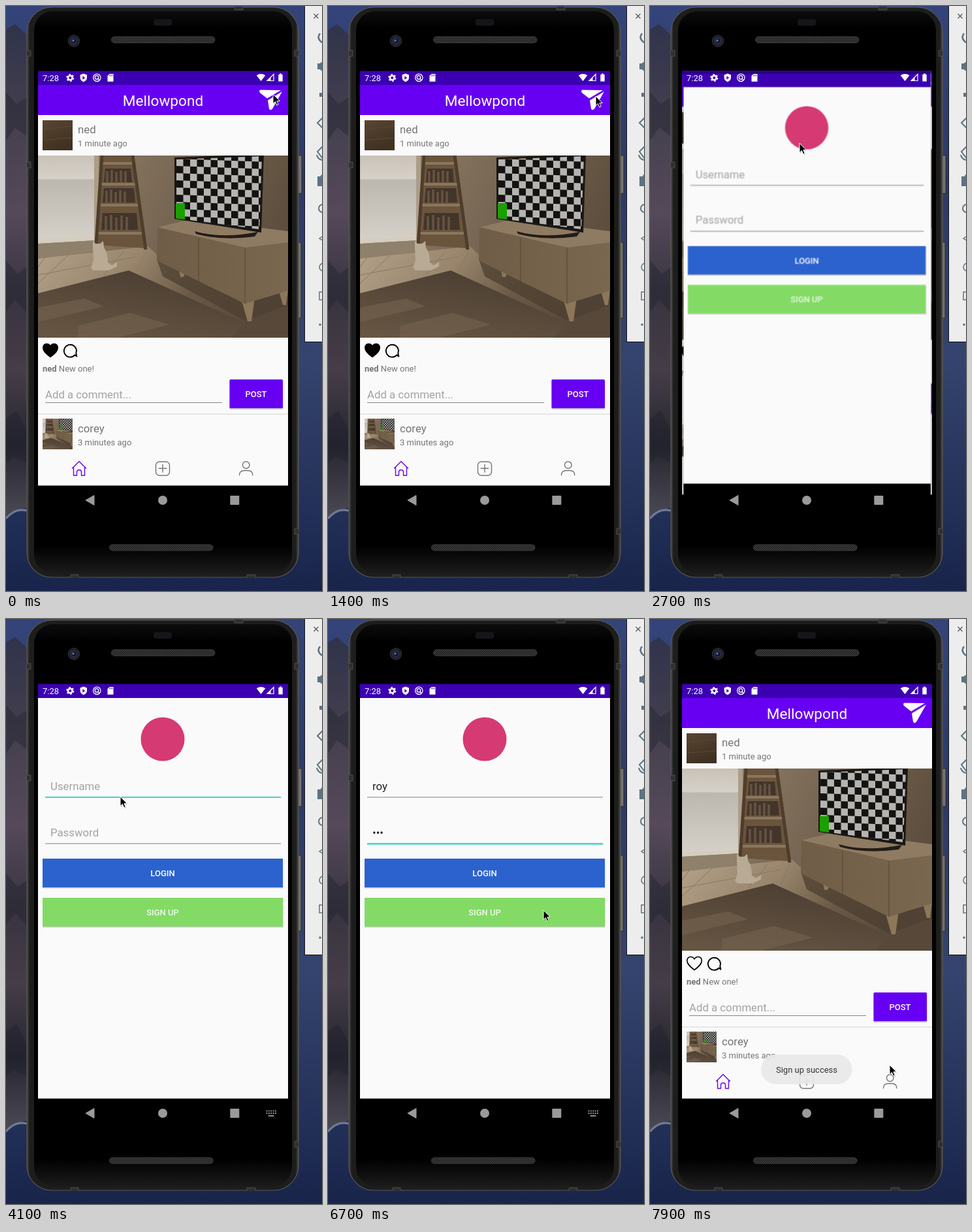
Write an HTML page that moves like this. It is 484x896 px and loops after 8 s.

```html
<!DOCTYPE html>
<html lang="en">
<head>
<meta charset="utf-8">
<title>Photo app on a phone</title>
<style>
html, body { margin: 0; width: 100%; height: 100%; overflow: hidden; background: #1f2a4c; }
svg.stage { display: block; width: 484px; height: 896px; }
text { font-family: Roboto, "Noto Sans", sans-serif; font-size: 13px; fill: #757575; white-space: pre; }
.big { font-size: 16.8px; }
.hint { fill: #a3a3a3; }
.dark { fill: #222; }
.btn { font-weight: 500; fill: #fff; text-anchor: middle; }
.title { font-size: 22.6px; fill: #fff; text-anchor: middle; }
.line { fill: none; stroke-width: 1.4; stroke-linejoin: round; stroke-linecap: round; }

/* one loop is 8 s, so 1.25% is 100 ms */
.a { animation: 8s step-end infinite; }
.win { transform-origin: 240.5px 440px; }
.home1 { animation-name: home1; }
.login { animation-name: login; }
.home2 { animation-name: home2; }
.dim1 { animation-name: dim1; }
.dim2 { animation-name: dim2; }
.feed2 { animation-name: feed2; }
.toast { animation-name: toast; }
.keys { animation-name: keys; }
.lineU { animation-name: lineU; }
.lineP { animation-name: lineP; }
.hintU { animation-name: hintU; }
.hintP { animation-name: hintP; }
.caretU { animation-name: caretU; }
.caretP { animation-name: caretP; }
.u1 { animation-name: u1; } .u2 { animation-name: u2; } .u3 { animation-name: u3; }
.p1 { animation-name: p1; } .p2 { animation-name: p2; } .p3 { animation-name: p3; }
.pointer { animation: pointer 8s ease-in-out infinite; }

@keyframes home1 {
  0% { transform: scale(1); opacity: 1; }
  31.25% { transform: scale(1.01); opacity: 1; }
  32.5% { transform: scale(1.034); opacity: 1; }
  33.75% { transform: scale(1.047); opacity: 1; }
  35% { transform: scale(1.05); opacity: 1; }
  36.25%, 100% { transform: scale(1.05); opacity: 0; }
}
@keyframes login {
  0% { transform: scale(.86); opacity: 0; }
  31.25% { transform: scale(.87); opacity: .5; }
  32.5% { transform: scale(.953); opacity: 1; }
  33.75% { transform: scale(.99); opacity: 1; }
  35% { transform: scale(.998); opacity: 1; }
  36.25% { transform: scale(1); opacity: 1; }
  91.25% { transform: scale(1.01); opacity: 1; }
  92.5% { transform: scale(1.032); opacity: 1; }
  93.75% { transform: scale(1.046); opacity: 1; }
  95% { transform: scale(1.05); opacity: 1; }
  96.25%, 100% { transform: scale(1.05); opacity: 0; }
}
@keyframes home2 {
  0% { transform: scale(.86); opacity: 0; }
  91.25% { transform: scale(.86); opacity: .5; }
  92.5% { transform: scale(.947); opacity: 1; }
  93.75% { transform: scale(.987); opacity: 1; }
  95% { transform: scale(.997); opacity: 1; }
  96.25%, 100% { transform: scale(1); opacity: 1; }
}
@keyframes dim1 { 0% { opacity: 0; } 31.25% { opacity: .1; } 32.5%, 100% { opacity: .2; } }
@keyframes dim2 { 0% { opacity: 0; } 91.25% { opacity: .1; } 92.5%, 100% { opacity: .2; } }
@keyframes feed2 { 0% { opacity: 0; } 96.25%, 100% { opacity: 1; } }
@keyframes toast {
  0% { opacity: 0; } 92.5% { opacity: .3; } 93.75% { opacity: .55; }
  95% { opacity: .8; } 96.25%, 100% { opacity: 1; }
}
@keyframes keys { 0% { opacity: 0; } 50% { opacity: 1; } 91.25%, 100% { opacity: 0; } }
@keyframes lineU { 0% { opacity: 0; } 50% { opacity: .75; } 52.5% { opacity: 1; } 67.5%, 100% { opacity: 0; } }
@keyframes lineP { 0% { opacity: 0; } 67.5%, 100% { opacity: 1; } }
@keyframes hintU { 0% { opacity: 1; } 55%, 100% { opacity: 0; } }
@keyframes hintP { 0% { opacity: 1; } 72.5%, 100% { opacity: 0; } }
@keyframes u1 { 0% { fill-opacity: 0; } 55%, 100% { fill-opacity: 1; } }
@keyframes u2 { 0% { fill-opacity: 0; } 57.5%, 100% { fill-opacity: 1; } }
@keyframes u3 { 0% { fill-opacity: 0; } 58.75%, 100% { fill-opacity: 1; } }
@keyframes p1 { 0% { fill-opacity: 0; } 72.5%, 100% { fill-opacity: 1; } }
@keyframes p2 { 0% { fill-opacity: 0; } 73.75%, 100% { fill-opacity: 1; } }
@keyframes p3 { 0% { fill-opacity: 0; } 75%, 100% { fill-opacity: 1; } }
@keyframes caretU {
  0% { opacity: 0; transform: none; }
  52.5% { opacity: 1; transform: none; }
  55% { opacity: 1; transform: translateX(6px); }
  57.5% { opacity: 1; transform: translateX(15px); }
  58.75% { opacity: 1; transform: translateX(23px); }
  65%, 100% { opacity: 0; transform: translateX(23px); }
}
@keyframes caretP {
  0% { opacity: 0; transform: none; }
  67.5% { opacity: 1; transform: none; }
  72.5% { opacity: 1; transform: translateX(6px); }
  73.75% { opacity: 1; transform: translateX(12px); }
  75% { opacity: 1; transform: translateX(18px); }
  81.25% { opacity: 0; transform: translateX(18px); }
  87.5% { opacity: 1; transform: translateX(18px); }
  91.25%, 100% { opacity: 0; transform: translateX(18px); }
}
@keyframes pointer {
  0%, 14% { transform: translate(409px, 135px); }
  17%, 22% { transform: translate(410px, 138px); }
  32.5%, 42% { transform: translate(229px, 210px); }
  49%, 59% { transform: translate(175px, 272px); }
  66.5%, 76% { transform: translate(306px, 320px); }
  81%, 85.5% { transform: translate(330px, 446px); }
  93%, 94% { transform: translate(364px, 573px); }
  98.5%, 100% { transform: translate(367px, 683px); }
}
</style>
</head>
<body>
<svg class="stage" viewBox="0 0 484 896">
<defs>
  <linearGradient id="sea" x2="0" y2="1">
    <stop offset="0" stop-color="#34447a"/><stop offset=".3" stop-color="#2c3a66"/>
    <stop offset=".6" stop-color="#35446e"/><stop offset=".8" stop-color="#27355d"/>
    <stop offset="1" stop-color="#18244a"/>
  </linearGradient>
  <linearGradient id="rock" x2="0" y2="1">
    <stop offset="0" stop-color="#30334b"/><stop offset=".2" stop-color="#45404e"/>
    <stop offset=".38" stop-color="#55495a"/><stop offset=".55" stop-color="#38343f"/>
    <stop offset=".7" stop-color="#453d47"/><stop offset=".85" stop-color="#26262f"/>
    <stop offset="1" stop-color="#4c4a55"/>
  </linearGradient>
  <linearGradient id="body" x2="1" y2="0">
    <stop offset="0" stop-color="#4c4b48"/><stop offset=".01" stop-color="#1d1d1c"/>
    <stop offset=".99" stop-color="#1d1d1c"/><stop offset="1" stop-color="#4c4b48"/>
  </linearGradient>
  <linearGradient id="face" x2="0" y2="1">
    <stop offset="0" stop-color="#0c0c0c"/><stop offset=".03" stop-color="#000"/>
    <stop offset=".95" stop-color="#000"/><stop offset="1" stop-color="#1b1b1b"/>
  </linearGradient>
  <linearGradient id="wall" x2="1" y2=".3">
    <stop offset="0" stop-color="#94866f"/><stop offset=".4" stop-color="#806f5b"/>
    <stop offset="1" stop-color="#5e4e3d"/>
  </linearGradient>
  <linearGradient id="pane" x2="0" y2="1">
    <stop offset="0" stop-color="#c9c2b7"/><stop offset=".27" stop-color="#d6d1c9"/>
    <stop offset=".29" stop-color="#bcb7af"/><stop offset="1" stop-color="#d6d1c8"/>
  </linearGradient>
  <linearGradient id="floor" x2="1" y2=".3">
    <stop offset="0" stop-color="#b3a189"/><stop offset=".4" stop-color="#98856c"/>
    <stop offset=".7" stop-color="#6b5945"/><stop offset="1" stop-color="#58483a"/>
  </linearGradient>
  <linearGradient id="rug" x1=".7" x2=".2" y2="1">
    <stop offset="0" stop-color="#4a3d31"/><stop offset="1" stop-color="#665543"/>
  </linearGradient>
  <linearGradient id="front" x2="1" y2="0">
    <stop offset="0" stop-color="#6f5d47"/><stop offset="1" stop-color="#7a674f"/>
  </linearGradient>
  <linearGradient id="brown" x2=".4" y2="1">
    <stop offset="0" stop-color="#594632"/><stop offset="1" stop-color="#403122"/>
  </linearGradient>
  <pattern id="mesh" width="3" height="3" patternUnits="userSpaceOnUse">
    <rect width="3" height="3" fill="#1a1a1a"/><path d="M0 0L3 3M3 0L0 3" stroke="#4a4a4a" stroke-width=".7"/>
  </pattern>
  <pattern id="check" width="21" height="22" patternUnits="userSpaceOnUse" patternTransform="translate(261 234) skewY(2)">
    <rect width="21" height="22" fill="#15130f"/><path d="M0 0H10.5V22H21V11H0Z" fill="#b4b4b2"/>
  </pattern>
  <!-- stops where the enlarged back window ends, below it all is black -->
  <clipPath id="screen"><rect x="49" y="99" width="383" height="650"/></clipPath>
  <clipPath id="shot"><rect x="49" y="229" width="383" height="279"/></clipPath>
  <path id="heart" d="M68 537.5C60 531.5 56.8 528 56.8 523.6C56.8 516.4 65.2 515.6 68 521C70.8 515.6 79.2 516.4 79.2 523.6C79.2 528 76 531.5 68 537.5Z" stroke-width="1.6" stroke="#000" stroke-linejoin="round"/>

  <g id="photo" clip-path="url(#shot)">
    <rect x="49" y="229" width="383" height="279" fill="url(#wall)"/>
    <rect x="49" y="229" width="86" height="130" fill="url(#pane)"/>
    <path d="M49 357L137 353V359L49 364Z" fill="#d6cdbf"/>
    <path d="M49 364L137 359V376L49 388Z" fill="#8f806b"/>
    <path d="M135 229H142V372H135Z" fill="#ab9d88"/>
    <path d="M49 387L217 368L236 385L432 425V508H49Z" fill="url(#floor)"/>
    <path d="M49 412L200 384M60 385L49 400M95 382L49 425M180 376L150 412M215 375L200 408M235 390L220 420" stroke="#8b7860" fill="none"/>
    <path d="M147 229H194L213 371L139 366Z" fill="#6a543c"/>
    <g fill="#43352a">
      <path d="M152 249H191L193 270H150Z"/><path d="M150 279H196L198 301H148Z"/><path d="M148 317H200L202 343H146Z"/>
    </g>
    <path d="M155 270V253M162 270V251M169 270V254M176 270V252M183 270V253M154 301V283M161 301V281M168 301V285M175 301V282M182 301V284M153 343V322M161 343V320M169 343V324M177 343V321M185 343V323" stroke="#665341" stroke-width="3.500"/>
    <path d="M148 241H193M146 273H198M144 305H202M141 348H208" stroke="#8a765e" stroke-width="4"/>
    <path d="M147 229L138 366M194 229L214 373" stroke="#4f3d2b" stroke-width="5"/>
    <path d="M49 440L188 405L365 485L345 508H49Z" fill="url(#rug)"/>
    <path d="M49 462L120 448L150 460L49 484ZM110 490L190 470L250 488L170 508H110Z" fill="#75634f" opacity=".6"/>
    <path d="M231 388L366 452L432 430V458L366 482L240 414Z" fill="#4d3f31" opacity=".75"/>
    <path d="M264 400L267 415H272L276 404ZM360 448L370 483H376L381 446ZM418 436L424 458H429L432 434Z" fill="#8d7759"/>
    <path d="M232 339L284 326L432 345V372L366 370Z" fill="#8f7b62"/>
    <path d="M232 339L366 370L432 362V436L366 456L231 390Z" fill="url(#front)"/>
    <path d="M295 355V423M366 370V456" stroke="#57462f" fill="none"/>
    <path d="M289 345Q330 357 386 346L381 353Q330 360 291 349Z" fill="#211d18"/>
    <path d="M258 232L395 227L391 347L258 326Z" fill="#1a1815"/>
    <path d="M261 235L392 230L388 342L261 325Z" fill="url(#check)"/>
    <path d="M260 302H274V327L260 325Z" fill="#1aa000"/>
    <path d="M133 359L137 364H144L149 360L150 370Q156 378 156 393L162 397L170 392V399L157 405H134L130 401L134 390L133 370Z" fill="#b9aa95"/>
  </g>

  <g id="bars">
    <rect x="49" y="99" width="383" height="683" fill="#000"/>
    <rect x="49" y="120" width="383" height="614.500" fill="#fafafa"/>
    <rect x="49" y="99.500" width="383" height="21.500" fill="#3c00b2"/>
  </g>

  <g id="chrome">
    <use href="#bars"/>
    <rect x="49" y="121" width="383" height="46" fill="#6700f3"/>
    <text class="title" x="240.5" y="153">Mellowpond</text>
    <path d="M388 130.500Q388 128.500 390 128.500L421 129L400 141.500L389 133ZM423 131L408 157.500Q405 161 403 157.500L401 144.500Z" fill="#fff"/>
    <g class="line" stroke="#757575">
      <path stroke="#6700f3" d="M101.500 708L112 697.500L122.500 708M103.500 706.500V719H108.500V714Q108.500 710.500 112 710.500Q115.500 710.500 115.500 714V719H120.500V706.500"/>
      <rect x="229.500" y="698" width="21" height="21" rx="5.500"/><path d="M240 702.500V714M234.300 708.300H245.700"/>
      <circle cx="367.700" cy="703" r="5.300"/><path d="M357.500 718.500Q357.500 711.500 365 711.500H370.500Q377.800 711.500 377.800 718.500"/>
    </g>
  </g>

  <g id="feed">
    <rect x="56" y="175" width="46" height="46" fill="url(#brown)"/>
    <path d="M56 189L102 184M56 205L102 202" stroke="#5c4834"/>
    <text class="big" x="110" y="195">ned</text>
    <text x="110" y="215">1 minute ago</text>
    <use href="#photo"/>
    <path class="line" stroke="#000" style="stroke-width:1.9" d="M105.500 534.500A9.500 9.500 0 1 1 107.300 531.500L108.300 536.800Z"/>
    <text x="56" y="560"><tspan font-weight="700">ned</tspan> New one!</text>
    <text class="big hint" x="60" y="600.500">Add a comment...</text>
    <rect x="60" y="607" width="271" height="1" fill="#858585"/>
    <rect x="342" y="573" width="82.500" height="45" rx="2" fill="#c9c9c9"/>
    <rect x="342.500" y="572" width="81.500" height="44" rx="1.500" fill="#6700f3"/>
    <text class="btn" x="383" y="599">POST</text>
    <rect x="49" y="624.500" width="383" height="1" fill="#d4d4d4"/>
    <svg x="56" y="632" width="46" height="47" viewBox="110 232 270 276" preserveAspectRatio="none"><use href="#photo"/></svg>
    <text class="big" x="110" y="652.500">corey</text>
    <text x="110" y="673">3 minutes ago</text>
  </g>
</defs>

<!-- desktop -->
<rect width="484" height="896" fill="url(#sea)"/>
<path d="M0 36L14 28L32 44V768L18 772L0 786Z" fill="url(#rock)"/>
<path d="M0 132L16 150L32 140V200L14 186L0 206ZM0 390L18 410L32 400V470L14 450L0 468ZM0 632L16 620L32 650V700L12 690L0 700Z" fill="#1c1d2a" opacity=".35"/>
<path d="M0 785Q14 768 32 773" fill="none" stroke="#6f7b98" stroke-width="3"/>

<!-- emulator tool strip -->
<rect x="457.500" y="-1" width="40" height="515.500" fill="#ededed" stroke="#111"/>
<g fill="none" stroke="#5b7483" stroke-width="2">
  <path d="M471.500 12L478.500 19M478.500 12L471.500 19" stroke="#555" stroke-width="1.200"/>
  <path d="M481 42Q475 49 484 56" stroke-width="2.600"/>
  <path d="M478 89H481L486 85V100L481 96H478Z" fill="#5b7483"/>
  <path d="M480 133H486V139H480Z" fill="#5b7483" stroke="none"/>
  <path d="M486 170L477 179L486 188"/>
  <path d="M486 214L477 223L486 235M476 228Q477 234 484 236"/>
  <path d="M478 262H482L484 259H486V275H478Z" fill="#5b7483"/>
  <circle cx="485" cy="310" r="6"/>
  <path d="M486 352L480 356L486 360" stroke-width="1.400"/>
  <circle cx="486" cy="400" r="6" stroke-width="1.500"/>
  <path d="M486 438H480V450H486" stroke-width="1.500"/>
  <circle cx="481" cy="488" r="1.800" fill="#5b7483" stroke="none"/>
</g>

<!-- phone -->
<path d="M447 229H453V287H447ZM447 362H452V478H447Z" fill="#77736e" stroke="#2b2b2b"/>
<rect x="32" y="2" width="416" height="873" rx="38" fill="url(#body)" stroke="#5a5854" stroke-width="1.200"/>
<path d="M32 68H38V77H32M32 239H38V248H32M448 68H442V77H448M448 800H442V809H448M350 1V6H363V1M99 876V871H111V876M369 876V871H382V876" fill="#30302e" stroke="#565550" stroke-width=".8"/>
<rect x="43" y="8" width="395" height="861" rx="29" fill="url(#face)"/>
<rect x="226" y="20" width="28" height="10" rx="3" fill="#15151a"/>
<rect x="161.500" y="47" width="158.500" height="9.500" rx="4.700" fill="url(#mesh)" stroke="#3c3c3c"/>
<rect x="158.500" y="825" width="158.500" height="9" rx="4.500" fill="url(#mesh)" stroke="#3c3c3c"/>
<circle cx="104" cy="53.500" r="8.800" fill="#202126" stroke="#303036"/>
<circle cx="104" cy="53.500" r="4.500" fill="#101630" stroke="#39436e"/>
<circle cx="103" cy="53" r="1.700" fill="#6572b0"/>

<!-- app -->
<g clip-path="url(#screen)">
  <g class="a win home1">
    <use href="#chrome"/><use href="#feed"/><use href="#heart"/>
    <rect class="a dim1" x="49" y="99" width="383" height="683"/>
  </g>

  <g class="a win login">
    <use href="#bars"/>
    <circle cx="240" cy="184" r="33.500" fill="#d63a72"/>
    <text class="big hint a hintU" x="68" y="262">Username</text>
    <text class="big dark" x="68" y="262"><tspan class="a u1">r</tspan><tspan class="a u2">o</tspan><tspan class="a u3">y</tspan></text>
    <rect x="60" y="272.500" width="361" height="1" fill="#808080"/>
    <rect class="a lineU" x="60" y="272" width="361" height="2" fill="#27d3c9"/>
    <rect class="a caretU" x="67.500" y="245" width="1.800" height="22" fill="#27d3c9"/>
    <text class="big hint a hintP" x="68" y="332.500">Password</text>
    <text class="big dark" x="68" y="332.500"><tspan class="a p1">•</tspan><tspan class="a p2">•</tspan><tspan class="a p3">•</tspan></text>
    <rect x="60" y="343.500" width="361" height="1" fill="#808080"/>
    <rect class="a lineP" x="60" y="343.500" width="361" height="2" fill="#27d3c9"/>
    <rect class="a caretP" x="67.500" y="315.500" width="1.800" height="22" fill="#27d3c9"/>
    <path d="M56 368H424.500V412.500H56ZM56 428H424.500V472.500H56Z" fill="#c8c8c8"/>
    <rect x="56" y="367" width="368" height="44" fill="#2c62ce"/>
    <text class="btn" x="240" y="394">LOGIN</text>
    <rect x="56" y="427" width="368" height="44" fill="#83db65"/>
    <text class="btn" x="240" y="454" fill-opacity=".85">SIGN UP</text>
    <rect class="a dim2" x="49" y="99" width="383" height="683"/>
  </g>

  <g class="a win home2">
    <use href="#chrome"/>
    <g class="a feed2"><use href="#feed"/><use href="#heart" fill="none"/></g>
  </g>

  <g class="a toast">
    <rect x="170" y="667" width="139.500" height="45.500" rx="22.700" fill="#e9e9e9" fill-opacity=".93"/>
    <text x="240" y="694.500" text-anchor="middle" style="fill:#333">Sign up success</text>
  </g>
</g>

<!-- status icons -->
<text x="56" y="114.500" style="fill:#fff">7:28</text>
<g fill="#fff">
  <circle cx="98.300" cy="110" r="3.300" fill="none" stroke="#fff" stroke-width="2.400"/>
  <circle cx="98.300" cy="110" r="5.200" fill="none" stroke="#fff" stroke-width="1.700" stroke-dasharray="2.700 2.745"/>
  <path d="M118.800 103.500L124 105.500V109.500Q124 114 118.800 116.300Q113.600 114 113.600 109.500V105.500Z"/>
  <path d="M117.300 107.300L121.300 110L117.300 112.700Z" fill="#3c00b2"/>
  <g fill="none" stroke="#fff" stroke-width="1.300"><circle cx="139.300" cy="109.800" r="5.700"/><circle cx="139" cy="109.400" r="2.700"/><path d="M141 111.500L143.500 114"/></g>
  <path d="M158.500 104H164.500V115.800H155.500V107Z"/>
  <path d="M158.700 105.300V107.500M160.700 105.300V107.500M162.700 105.300V107.500" stroke="#3c00b2" stroke-width=".9"/>
  <path d="M383.700 106.300Q390.500 101.500 397.300 106.300L390.500 115Z"/>
  <path d="M410 104.500V114.500H400Z" fill="none" stroke="#fff" stroke-width="1.200"/><path d="M405.500 109V114.500H400Z"/>
  <path d="M417.300 105H419V103.500H422V105H423.700V115.500H417.300Z"/>
</g>

<!-- navigation keys -->
<g fill="#9a9a9a">
  <path d="M122 757L135 749.500V764.500Z" stroke="#9a9a9a" stroke-linejoin="round"/>
  <circle cx="240" cy="757" r="7"/>
  <rect x="343.300" y="750" width="14" height="14" rx="1"/>
</g>
<g class="a keys" stroke="#9a9a9a" stroke-width="1.800" fill="none">
  <path d="M398.500 753.500H414M398.500 757H414" stroke-dasharray="1.900 1.500"/><path d="M401.500 761H410.500"/>
</g>

<g class="pointer">
  <path d="M1 1.500V16L4.400 12.900L6.800 18.500L9.200 17.500L6.900 12.100H11.400Z" fill="#000" opacity=".2"/>
  <path d="M0 0V14.500L3.400 11.400L5.800 17L8.200 16L5.900 10.600H10.400Z" stroke="#fff" stroke-width="1"/>
</g>
</svg>
</body>
</html>
```
